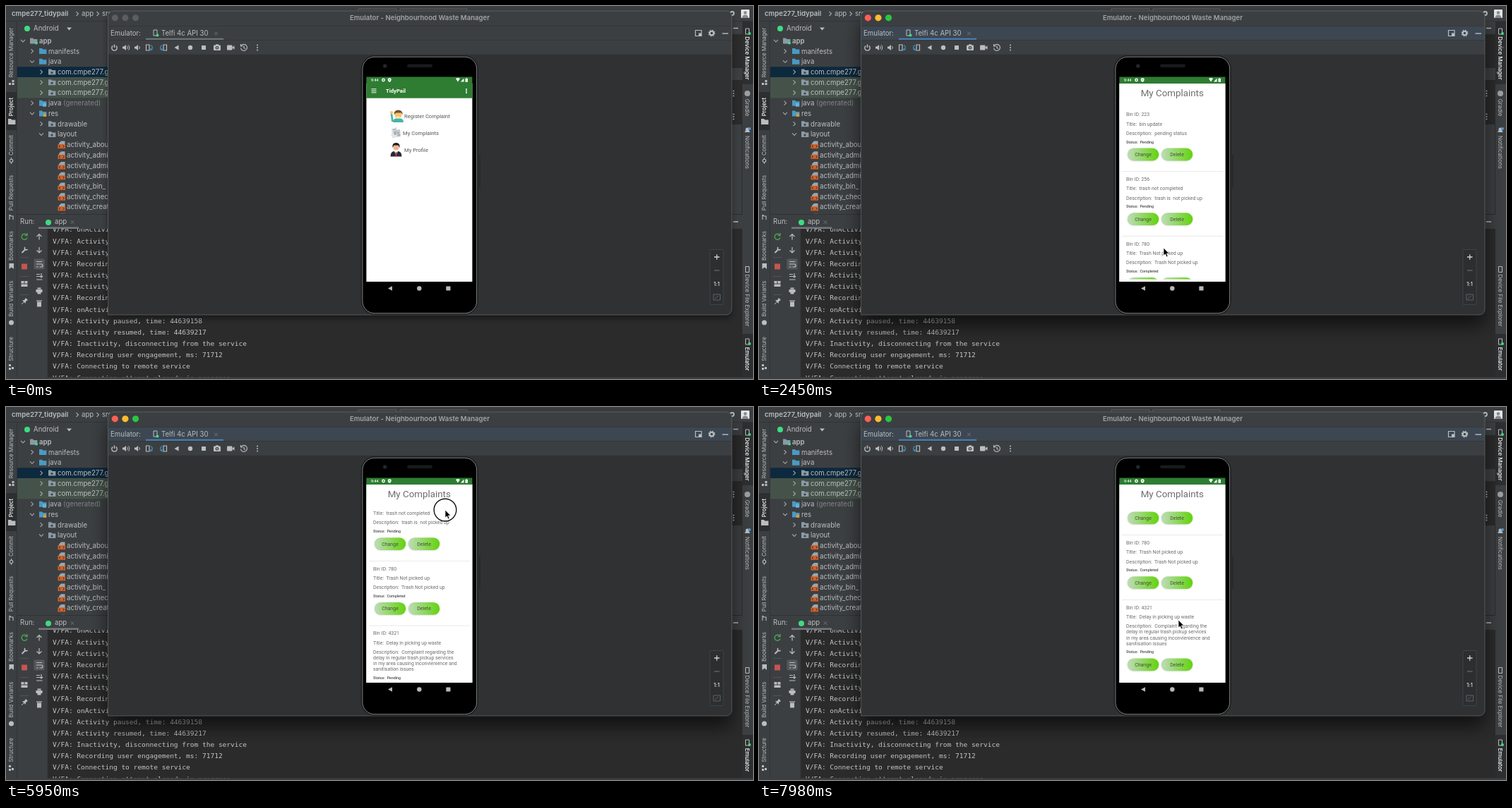
These frames come from a looping animation (1058 by 529 pixels, 8000 ms). An HTML page:

```html
<!DOCTYPE html>
<html lang="en">
<head>
<meta charset="utf-8">
<title>Emulator session</title>
<style>
html, body { margin: 0; width: 100%; height: 100%; overflow: hidden; background: #2b2b2b; }
svg { display: block; width: 1058px; height: 529px; }
text { white-space: pre; font-family: Inter, sans-serif; }
.mono { font-family: "DejaVu Sans Mono", monospace; }
.app text { font-family: Roboto, sans-serif; }
.idle .focus, svg:not(.idle) .blur { display: none; }
</style>
</head>
<body>
<svg id="stage" class="idle" viewBox="0 0 1058 529"></svg>
<script>
const FG = '#bbbdbf', PANEL = '#3c3f41', DARK = '#2b2b2b', GREEN = '#2e7d32';

const rect = (x, y, w, h, fill, r = 0, extra = '') =>
  `<rect x="${x}" y="${y}" width="${w}" height="${h}" fill="${fill}" rx="${r}" ${extra}/>`;
const dot = (x, y, r, fill, extra = '') => `<circle cx="${x}" cy="${y}" r="${r}" fill="${fill}" ${extra}/>`;
const line = (d, stroke = FG, w = 1.2, fill = 'none') =>
  `<path d="${d}" stroke="${stroke}" stroke-width="${w}" fill="${fill}"/>`;
const fillPath = (d, fill = FG) => `<path d="${d}" fill="${fill}"/>`;
// y is the middle of the text line
const text = (x, y, s, size = 9.65, fill = FG, extra = '') =>
  `<text x="${x}" y="${y + size * .36}" font-size="${size}" fill="${fill}" ${extra}>${s}</text>`;
const bold = 'font-weight="600"', medium = 'font-weight="500"', mid = 'text-anchor="middle"';
const turned = (x, y, s, deg, fill = FG, extra = '') =>
  `<g transform="translate(${x} ${y}) rotate(${deg})">${text(0, 0, s, 7.9, fill, mid + ' ' + extra)}</g>`;
const at = (x, y, s, extra = '') => `<g transform="translate(${x} ${y}) ${extra}">${s}</g>`;

const chevron = (x, y, open) => line(open ? `M${x - 3} ${y - 1.5}l3 3 3-3` : `M${x - 1.5} ${y - 3}l3 3-3 3`, '#a6a8aa', 1.1);
const folder = (x, y, fill) => fillPath(`M${x - 5} ${y - 4}h4l1.4 1.5h5v6.5h-10.4z`, fill);
const cross = (x, y) => line(`M${x - 2.3} ${y - 2.3}l4.6 4.6m0-4.6l-4.6 4.6`, '#77797b', .9);
const dots = (x, y, fill = FG, gap = 3.4) => [-gap, 0, gap].map(d => dot(x, y + d, 1, fill)).join('');
const device = (x, y) => line(`M${x - 2.5} ${y - 4}h5v8h-5z`, FG, 1);

function tree() {
  const row = i => 49.4 + i * 14.72;
  let s = rect(15, 22, 130, 275, PANEL) + rect(15, row(3) - 7.3, 130, 14.7, '#0d293e')
    + rect(15, row(4) - 7.3, 130, 29.4, '#455249');
  s += dot(30, 32, 4, '#3ddc84') + text(39, 32, 'Android') + fillPath('M86 30.5h7l-3.5 4z');
  const rows = [['app', 24, 1, bold], ['manifests', 37, 0], ['java', 37, 1], ['com.cmpe277.g', 50, 0], ['com.cmpe277.g', 50, 0],
    ['com.cmpe277.g', 50, 0], ['java', 37, 0], ['res', 37, 1], ['drawable', 50, 0], ['layout', 50, 1]];
  rows.forEach(([name, x, open, extra], i) => {
    const y = row(i), pkg = x === 50;
    s += chevron(x, y, open) + folder(x + 15, y, pkg || i < 1 ? '#8b9aa5' : '#4a9ac4');
    if (pkg) s += dot(x + 15, y + 1, 1.5, PANEL);
    if (!i) s += dot(x + 19, y + 3, 2, '#3ddc84');
    if (name === 'res') s += rect(53, y, 4, 4.5, '#d99a3d');
    if (i === 6) s += rect(52, y, 5, 5, '#6ab0d8');
    s += text(x + 23, y, name, 9.65, FG, extra);
  });
  s += text(81, row(6), '(generated)', 9.65, '#808385');
  ['about', 'admin', 'admin', 'admin', 'bin_', 'check', 'create', ''].forEach((name, i) => {
    const y = row(10 + i);
    s += fillPath(`M75 ${y - 2}l3-3h5.5v6h-8.5z`, '#9aa7b0') + rect(73.5, y - .5, 10.5, 6, '#d2622b')
      + line(`M77 ${y + .8}l-2 1.7 2 1.7m3.5-3.4l2 1.7-2 1.7`, '#3a2a22', .9);
    if (name) s += text(86, y, 'activity_' + name);
  });
  return s;
}

function consolePane() {
  let s = rect(0, 295, 1058, 234, DARK) + rect(15, 295, 1028, 21, PANEL) + rect(15, 295, 1028, 1, '#2f3133')
    + rect(15, 316, 44, 213, PANEL) + rect(58.5, 316, 1, 213, '#303234');
  const logs = ['onActivityCreated', 'Activity resumed', 'Activity paused', 'Recording user', 'Activity resumed', 'Activity paused',
    'Recording user', 'onActivityCreated', 'Activity paused, time: 44639158', 'Activity resumed, time: 44639217',
    'Inactivity, disconnecting from the service', 'Recording user engagement, ms: 71712', 'Connecting to remote service',
    'Connection attempt already in progress'];
  s += '<g clip-path="url(#logs)">' + logs.map((m, i) =>
    text(66, 317 + i * 16.16, 'V/FA: ' + m, 9.52, '#c3c5c7', 'class="mono"')).join('') + '</g>';
  s += text(20, 306, 'Run:') + dot(60, 307, 4, '#3ddc84') + text(69, 306, 'app') + cross(94, 306.5) + rect(46, 313.5, 57, 2.5, '#747a80');
  s += line('M29 324.5a4 4 0 1 0 1 4M30 322v3.5h-3.5', '#499c54', 1.5)
    + line('M47 331.5v-8m-3.5 3.5l3.5-3.5 3.5 3.5M47 342v8m-3.5-3.5l3.5 3.5 3.5-3.5')
    + line('M22.5 350l5-5', FG, 2) + line('M27 342a2.3 2.3 0 1 0 3.5 3', FG, 1.5)
    + rect(22, 365.5, 8, 8, '#c75450') + rect(39.5, 358.5, 15, 15, '#55585a', 2)
    + line('M43 362.5h8M43 366h7a1.7 1.7 0 0 1 0 4h-2.5M43 370h2.5')
    + line('M43 380.5h5M43 383.5h5M43 388h8.5M50 379v6m-2-2l2 2 2-2')
    + rect(21.5, 390, 4, 3.5, FG) + rect(26.5, 390, 4, 3.5, FG) + rect(21.5, 394.5, 9, 3.5, FG)
    + rect(42.5, 402, 9, 4, FG) + rect(44.5, 399.5, 5, 2, FG) + rect(44.5, 405, 5, 3.5, FG)
    + line('M22 423l3.5-3.5', FG, 1) + fillPath('M23 417.5l3-.5 2-3 3 3-3 2-.5 3z')
    + rect(44, 419.5, 6, 7, FG) + rect(43, 417.5, 8, 1.2, FG);
  return s + [356, 383, 409].map(y => rect(20, y, 12, 1, '#515456')).join('');
}

function stripes() {
  let s = rect(0, 22, 15, 507, PANEL) + rect(0, 122, 15, 54, '#2c2e2f') + rect(15, 22, 1, 507, '#323436')
    + rect(1043, 22, 15, 507, PANEL) + rect(1043, 22, 15, 89, '#2c2e2f') + rect(1043, 465, 15, 64, '#2c2e2f');
  const label = (x, deg) => ([name, y, on]) => turned(x, y, name, deg, on ? '#fff' : FG, on ? medium : '');
  s += [['Resource Manager', 66], ['Project', 143, 1], ['Commit', 197.5], ['Pull Requests', 265], ['Bookmarks', 340],
    ['Build Variants', 415], ['Structure', 486.5]].map(label(7.5, -90)).join('');
  s += [['Device Manager', 74, 1], ['Gradle', 144], ['Notifications', 207.5], ['Device File Explorer', 417.5],
    ['Emulator', 500.5, 1]].map(label(1050, 90)).join('');
  s += rect(4, 109, 3, 3, FG) + rect(8.5, 109, 3, 3, FG) + rect(8.5, 105, 3, 3, FG) + folder(8, 164, FG)
    + dot(7.5, 219.5, 2.2, 'none', `stroke="${FG}" stroke-width="1.1"`) + line('M7.5 215v2m0 5v2', FG, 1.1)
    + line('M5 303v-7m0 0l2 2m3 5v-5h-3', FG, 1.1) + fillPath('M4.5 365h6.5v8l-3.2-2.5-3.3 2.5z')
    + dot(7.5, 449, 3.5, FG) + rect(4, 508, 3, 3, FG) + rect(8, 512, 3, 3, FG) + rect(4, 513, 3, 3, FG);
  s += device(1050, 36) + dot(1053, 39, 2, '#3ddc84') + dot(1050, 124, 4, '#9da0a2')
    + fillPath('M1046 179l1.5-2v-2a2.5 2.5 0 0 1 5 0v2l1.5 2z') + dot(1053, 174, 2, '#4a9ae0')
    + device(1050, 373.5) + device(1050, 476) + dot(1053, 479, 2, '#3ddc84');
  return s;
}

function ide() {
  return rect(0, 0, 1058, 529, DARK) + tree() + consolePane() + rect(1028, 22, 15, 274, DARK) + rect(1028, 22, 15, 18, PANEL)
    + rect(1028, 88, 15, 17, PANEL) + rect(1028, 168, 14, 127, PANEL) + rect(1028, 297, 15, 18, PANEL) + stripes()
    + rect(0, 526.5, 1058, 2.5, PANEL) + rect(0, 0, 1058, 22, PANEL) + rect(0, 21, 1058, 1, '#313335')
    + text(8, 11, 'cmpe277_tidypail', 9.6, FG, bold) + chevron(101, 11) + text(107, 11, 'app') + chevron(130, 11) + text(136, 11, 'src')
    + line('M499 9v-5h54v5M558 9v-5h95v5', '#5e6163', 1) + dot(1028.5, 10.5, 2.5, 'none', `stroke="${FG}" stroke-width="1.8"`)
    + rect(1041, 5, 12, 12, '#e4e4e4', 1) + dot(1047, 9.5, 2.2, '#8a8a8a') + fillPath('M1042.5 17a4.5 4.5 0 0 1 9 0z', '#8a8a8a')
    + line('M1030 31.5h7M1030 306h7', FG, 1.3) + dots(1030.5, 124) + dots(1030.5, 157);
}

function toolbar() {
  const y = 59, arrow = '#3592c4';
  const speaker = x => fillPath(`M${x - 4} 57.5h2l3-2.5v8l-3-2.5h-2z`);
  const rotate = (x, k) => at(x, y, line('M-4.5-4h4.5v8h-4.5z') + line('M2-3.5a4 4 0 0 1 .5 7m2-1l-2.5 1 .5-2.5', arrow, 1.3), `scale(${k} 1)`);
  return line('M151.3 56.5a3.7 3.7 0 1 0 4.4 0M153.5 54.5v4.5', FG, 1.4)
    + speaker(169) + line('M171.5 57a3 3 0 0 1 0 4M173 55.2a5 5 0 0 1 0 7.6', FG, 1) + speaker(186) + line('M188.5 57a3 3 0 0 1 0 4', FG, 1)
    + rotate(203, 1) + rotate(223, -1)
    + fillPath('M238.5 59l6-3.5v7z') + dot(261, y, 3.2, FG) + rect(277, 56, 6, 6, FG)
    + rect(294, 55.5, 10, 7.5, FG, 1) + rect(297, 54.3, 4, 2, FG) + dot(299, 59.3, 2.3, PANEL) + dot(299, 59.3, 1.1, FG)
    + rect(313, 55.5, 7.5, 7, FG, 1) + fillPath('M320 59l3.5-2.7v5.4z')
    + line('M333.5 56a4.5 4.5 0 1 1-1 3.5M332.5 54v3h3M337 56.5v3l2 1') + dots(356, y);
}

function emulator() {
  const body = 'M144.5 438v-423a8 8 0 0 1 8-8h867.5a8 8 0 0 1 8 8v415a8 8 0 0 1-8 8z';
  const lights = ['#ff5f57', '#febc2e', '#28c840'];
  let s = `<path class="blur" d="${body}" filter="url(#soft)"/><path class="focus" d="${body}" filter="url(#deep)"/>`
    + fillPath(body, '#2f3133') + fillPath('M145 28v-13a8 8 0 0 1 8-8h867a8 8 0 0 1 8 8v13z', PANEL)
    + rect(145, 28, 883, 20.5, PANEL, 0, 'class="blur"') + rect(145, 28, 883, 20.5, '#3d4752', 0, 'class="focus"')
    + rect(145, 48.5, 883, 20.5, PANEL) + [28, 48.2, 68.6].map(y => rect(145, y, 883, .7, '#323436')).join('');
  lights.forEach((c, i) => {
    const x = 154.3 + i * 14.6;
    s += dot(x, 16.8, 4.5, '#5b5d5f', 'class="blur"') + dot(x, 16.8, 4.6, c, 'class="focus"');
  });
  s += text(586, 16.5, 'Emulator - Neighbourhood Waste Manager', 9.6, '#a2a4a6', bold + ' ' + mid)
    + text(148, 38.5, 'Emulator:') + line('M209 34h5v8h-5z', FG, 1) + dot(214.5, 41.5, 2, '#3ddc84')
    + text(220, 38.5, 'Telfi 4c API 30') + cross(297.5, 39)
    + rect(198, 45.8, 110, 2, '#747a80', 0, 'class="blur"') + rect(198, 45.8, 110, 2, '#4a82b8', 0, 'class="focus"')
    + line('M976.5 34.5h8.5v8h-8.5z') + rect(981, 38.5, 4, 4, FG)
    + dot(999.5, 38.5, 2.8, 'none', `stroke="${FG}" stroke-width="2"`) + dot(999.5, 38.5, 4.3, 'none', `stroke="${FG}" stroke-width="1.2" stroke-dasharray="1.7 1.68"`)
    + line('M1014.5 39h8.5', FG, 1.4) + toolbar();
  s += rect(997, 345.5, 19, 78, '#2c2e30', 1, 'stroke="#46494b" stroke-width=".8"')
    + line('M1003 356h7.5M1006.75 352.3v7.5', '#d0d2d4', 1.3) + line('M1003 375h7.5', '#66696b', 1.3)
    + text(1006.5, 394, '1:1', 7.2, '#d0d2d4', bold + ' ' + mid) + line('M1002 409h9.5v8h-9.5zM1004 415l5-4', '#66696b', .9);
  return s + line(body, '#626466', .8);
}

function phone() {
  return rect(670.3, 211, 1.2, 47, '#222426') + rect(503.5, 71, 164.5, 366, '#050505', 19, 'stroke="#1a1b1c" stroke-width="1.5"')
    + rect(504.9, 72.2, 161.8, 363.6, '#000', 17, 'stroke="#96999b" stroke-width=".9"')
    + dot(536.7, 85, 3, '#1b1d20') + dot(536.7, 85, 1.2, '#2f3540') + rect(568, 82.5, 36, 4.6, '#191a1b', 2.3)
    + fillPath('M541 400.5l6-3.3v6.6z', '#b8b8b8') + dot(585.3, 400.5, 3.2, '#b8b8b8') + rect(623.3, 397.4, 6.2, 6.2, '#b8b8b8', .5);
}

function home() {
  const ink = '#555';
  const waver = fillPath('M548 165q0-5.5 5-5.5h5q5 0 5 5.5z', '#45b5a4') + line('M547.5 164l-1.5-11', '#45b5a4', 2.6)
    + dot(546, 151, 2, '#f5c66a') + dot(555.5, 154.5, 5, '#f5c66a') + fillPath('M549.5 154q0-6.5 6-6.5t6.5 6.5l-2.5-2.5h-7z', '#74502d')
    + fillPath('M553 157h5q-2.5 3-5 0z', '#fff');
  const papers = fillPath('M546 174l7-2 2 9-8 2z', '#d9dce0') + fillPath('M552 176l6-1 1 10-7 1z', '#c4c8cd')
    + fillPath('M545 182l6-3 3 6-6 3z', '#e3e5e8') + line('M548 176l4-1m-3 4l4-1m1 2l3 0m-2 3l3 0', '#7f868d', .8) + dot(551, 181, 1.7, '#8fae8a');
  const profile = fillPath('M544.5 213.5q0-7 5-7.5h6q5 .5 5 7.5z', '#252b38') + fillPath('M550 206h5l-2.5 5z', '#fff') + fillPath('M552 207h1.2l.6 5-1.2 1.5-1.2-1.5z', '#c33')
    + dot(552.5, 200.5, 4, '#f0b48c') + fillPath('M547.5 201q-1-7 5-7t5 7l-2-3.5h-6z', '#1d1a1a');
  return rect(510, 110, 151, 281, '#fff') + rect(510, 109, 151, 21.7, GREEN)
    + line('M517.5 117.8h7M517.5 120.3h7M517.5 122.8h7', '#fff', 1) + text(538, 120.5, 'TidyPail', 7.65, '#fff', bold) + dots(652, 120.5, '#fff', 2.4)
    + waver + papers + profile
    + text(564, 156.3, 'Register Complaint', 7.65, ink) + text(562, 180.3, 'My Complaints', 7.65, ink) + text(564, 204.2, 'My Profile', 7.65, ink);
}

function complaint(y, id, title, desc, status) {
  const ink = '#6c6c6c', extra = (desc.length - 1) * 8.15;
  const button = (x, s) => rect(x, y + 49, 44, 17, '#000', 8.5, 'opacity=".16" filter="url(#blur)"')
    + rect(x - .3, y + 47.7, 44.6, 17.8, 'url(#lime)', 8.9) + text(x + 22, y + 56.5, s, 7, '#42513c', mid);
  let s = text(520, y, 'Bin ID: ' + id, 6.95, ink) + text(520, y + 13.2, 'Title:  ' + title, 6.95, ink)
    + desc.map((d, i) => text(520, y + 26.5 + i * 8.15, (i ? '' : 'Description:  ') + d, 6.95, ink)).join('');
  y += extra;
  return s + text(520, y + 38.7, 'Status:  ' + status, 5.35, '#4c4c4c', medium)
    + button(522, 'Change') + button(570, 'Delete') + rect(514, y + 80.4, 143, .8, '#e4e4e4');
}

function list() {
  return rect(510, 110, 151, 281, '#fff') + text(585.3, 123, 'My Complaints', 13.35, '#6c6c6c', mid)
    + '<g clip-path="url(#rows)"><g id="scroll">'
    + complaint(153.9, 223, 'bin update', ['pending status'], 'Pending')
    + complaint(245.6, 256, 'trash not completed', ['trash is  not picked up'], 'Pending')
    + complaint(337.4, 780, 'Trash Not picked up', ['Trash Not picked up'], 'Completed')
    + complaint(429.1, 4321, 'Delay in picking up waste', ['Complaint regarding the', 'delay in regular trash pickup services',
      'in my area causing inconvienience and', 'sanitisation issues'], 'Pending')
    + '</g></g>';
}

const statusBar = () => rect(510, 100, 151, 10, GREEN) + text(517, 105, '9:44', 5.3, '#fff', medium)
  + dot(534.5, 105, 1.7, 'none', 'stroke="#fff" stroke-width="1.4"') + fillPath('M540.8 103l2.4-1 2.4 1v2q0 2-2.4 3-2.4-1-2.4-3z', '#fff') + dot(543.2, 104.7, .8, GREEN)
  + fillPath('M637 103q3-2 6 0l-3 4.5zM644 107.5l4.5-5v5zM650.5 103h1v-.8h1.5v.8h1v4.7h-3.5z', '#fff');

const clip = (id, x, y, w, h) => `<clipPath id="${id}">${rect(x, y, w, h, '#000')}</clipPath>`;
const shadow = (id, dy, blur, a) => `<filter id="${id}" x="-10%" y="-10%" width="120%" height="125%"><feDropShadow dx="0" dy="${dy}" stdDeviation="${blur}" flood-opacity="${a}"/></filter>`;

const stage = document.getElementById('stage');
stage.innerHTML = '<defs>' + clip('logs', 60, 316, 998, 210.5) + clip('screen', 510.4, 100.4, 150, 290.6) + clip('rows', 510, 144.5, 151, 243)
  + shadow('soft', 5, 5, .45) + shadow('deep', 16, 13, .6) + '<filter id="blur"><feGaussianBlur stdDeviation="1"/></filter>'
  + '<linearGradient id="lime"><stop stop-color="#bfdcb9"/><stop offset="1" stop-color="#62d30c"/></linearGradient></defs>'
  + ide() + emulator() + phone()
  + `<g class="app" clip-path="url(#screen)">${home()}<g id="page">${list()}</g>${statusBar()}</g>`
  + `<g id="cursor">${dot(0, 0, 15.8, 'none', 'id="ring" stroke="#111" stroke-width="1.4"')}`
  + '<path d="M0 0v11l2.5-2.2 1.7 4 1.9-.8-1.7-3.9h3.4z" fill="#000" stroke="#fff" stroke-width=".7"/></g>';

const path = [[70, 118, 390], [140, 330, 262], [210, 540, 190], [280, 603, 170], [420, 603, 170], [630, 588, 182.5], [1610, 588, 182.5],
  [1820, 615, 236], [2240, 615, 236], [2450, 573, 343], [3780, 573, 343], [3850, 591.5, 333], [3920, 600, 310], [4060, 618, 240],
  [4200, 620, 218], [4270, 620, 218], [4620, 625, 231], [4970, 625, 231], [5110, 615, 272], [5530, 615, 272], [5740, 618, 285],
  [5810, 618, 285], [5950, 622, 146], [6230, 625, 133], [6510, 625, 133], [6650, 627, 165], [6790, 600, 262], [6930, 540, 310],
  [7140, 533, 308], [7350, 542, 306], [7420, 542, 306], [7980, 594, 302]];
const scrolls = [[4270, 0], [4340, 22], [4410, 52], [4480, 78], [4550, 91], [4620, 96.2], [5810, 96.2], [5880, 99], [5950, 108.1],
  [6020, 124], [6090, 138], [6160, 143], [6230, 144.8]];
const presses = [[980, 1190], [3920, 4340], [5600, 6020]];

function sample(keys, t) {
  if (t <= keys[0][0]) return keys[0].slice(1);
  const i = keys.findIndex(k => k[0] > t);
  if (i < 0) return keys[keys.length - 1].slice(1);
  const a = keys[i - 1], b = keys[i], p = (t - a[0]) / (b[0] - a[0]);
  return a.slice(1).map((v, n) => v + (b[n + 1] - v) * p);
}

const [page, scroll, cursor, ring] = ['page', 'scroll', 'cursor', 'ring'].map(id => document.getElementById(id));

function draw(now) {
  const t = Math.floor(now % 8000 / 70) * 70;
  const [x, y] = sample(path, t), [top] = sample(scrolls, t);
  const open = 1 - (1 - Math.min(1, Math.max(0, (t - 1260) / 350))) ** 2;
  const k = .85 + .15 * open;
  stage.classList.toggle('idle', t < 980);
  page.setAttribute('opacity', open);
  page.setAttribute('transform', `translate(${585.3 * (1 - k)} ${250 * (1 - k)}) scale(${k})`);
  scroll.setAttribute('transform', `translate(0 ${-top})`);
  cursor.setAttribute('transform', `translate(${x} ${y})`);
  cursor.setAttribute('visibility', t < 70 ? 'hidden' : 'visible');
  ring.setAttribute('opacity', presses.some(([a, b]) => t >= a && t < b) ? 1 : 0);
}
function tick() {
  draw(performance.now());
  requestAnimationFrame(tick);
}
tick();
</script>
</body>
</html>
```
